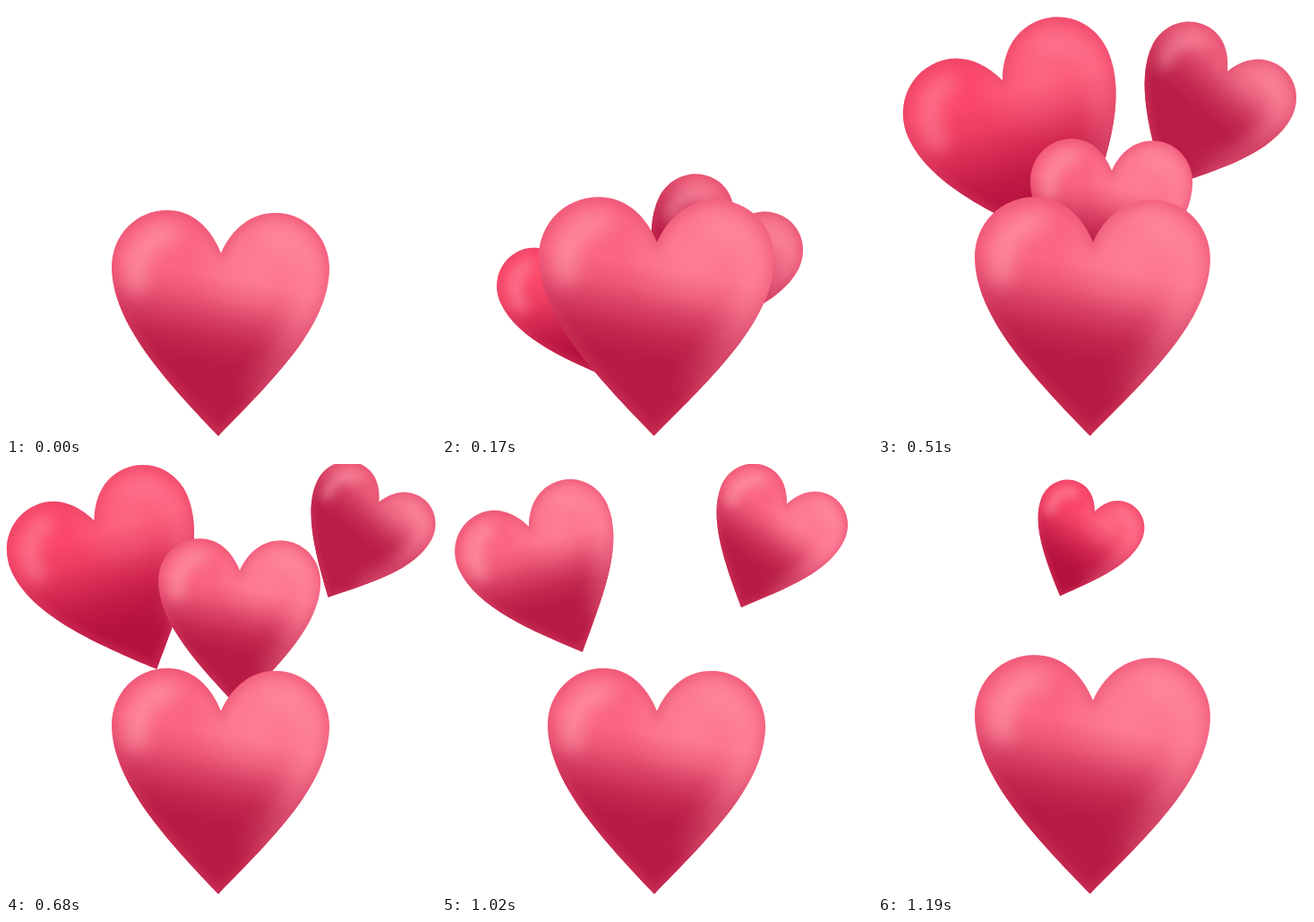
These frames come from a looping animation (480x480 px, 1.36 s). An HTML page with a canvas:

```html
<!DOCTYPE html>
<html lang="en">
<head>
<meta charset="utf-8">
<title>Floating hearts</title>
<style>
  html, body { margin: 0; width: 100%; height: 100%; overflow: hidden; background: #fff; }
  canvas { display: block; width: 480px; height: 480px; }
</style>
</head>
<body>
<canvas id="stage" width="480" height="480"></canvas>
<script>
const ctx = document.getElementById('stage').getContext('2d');
const SIZE = 480, STEP = 170, STEPS = 8;

// All paths share one origin: the notch between the lobes.
const outline = new Path2D('M0 0C-12-30-33-48-60-48C-95-48-122-20-122 16C-121 79-60 144-3 204C59 140 120 82 121 17C121-17 95-45 61-45C33-45 12-27 0 0Z');
const leftGlow = new Path2D('M-58-22C-84-20-98 2-94 34');
const rightGlow = new Path2D('M58-20C88-16 103 5 102 30C98 70 75 115 45 150');

const tones = {
  pink: { base: '#fb6683', dark: '184,28,69', from: 26, to: 122, glow: 1 },
  red: { base: '#fb486a', dark: '182,18,63', from: 15, to: 140, glow: 0.75 },
  deep: { base: '#f0607d', dark: '186,30,72', from: -20, to: 75, glow: 0.85 }
};

function softStroke(path, style, width, blur) {
  ctx.filter = `blur(${blur}px)`;
  ctx.strokeStyle = style;
  ctx.lineWidth = width;
  ctx.lineCap = 'round';
  ctx.stroke(path);
  ctx.filter = 'none';
}

function fade(gradient, color, ...alphas) {
  alphas.forEach((a, i) =>
    gradient.addColorStop(i / (alphas.length - 1), `rgba(${color},${a})`));
  return gradient;
}

function wash(style) {
  ctx.fillStyle = style;
  ctx.fillRect(-150, -80, 300, 300);
}

function drawHeart({ base, dark, from, to, glow }, x, y, scale, angle = 0, scaleY = scale) {
  ctx.save();
  ctx.translate(x, y);
  ctx.rotate(angle * Math.PI / 180);
  ctx.scale(scale, scaleY);
  ctx.fillStyle = base;
  ctx.fill(outline);
  ctx.clip(outline);

  const lobe = ctx.createRadialGradient(40, 14, 0, 40, 14, 78);
  wash(fade(lobe, '255,152,168', 0.5 * glow, 0.3 * glow, 0));
  wash(fade(ctx.createLinearGradient(0, from, -18, to), dark, 0, 0.2, 0.55, 0.85, 1));

  softStroke(outline, 'rgba(222,68,102,.45)', 10, 5 * scale);
  softStroke(leftGlow, `rgba(255,166,182,${0.65 * glow})`, 20, 10 * scale);
  const side = ctx.createLinearGradient(0, -20, 0, 150);
  softStroke(rightGlow, fade(side, '255,148,167', 0.7 * glow, 0.55 * glow, 0.28 * glow), 28, 13 * scale);
  ctx.restore();
}

// Hearts rise each step; after `turn` they drift sideways and lean by `spin`.
const flights = [
  { tone: 'red', first: 1, life: 5, x: 139, y: 287, rise: 102, turn: 2, drift: -50,
    size: 1, birth: 0.7, shrink: 0.12, power: 2, tilt: -23.7 },
  { tone: 'deep', first: 1, life: 5, x: 326, y: 243, rise: 85, turn: 0, drift: 32,
    size: 0.72, shrink: 0.18, tilt: 27.2 },
  { tone: 'pink', first: 3, life: 4, x: 261, y: 184, rise: 65, turn: 1, drift: 62,
    size: 0.745, shrink: 0.17, spin: 23 },
  { tone: 'pink', first: 5, life: 2, x: 130, y: 179, rise: 109, turn: 0, drift: -33,
    size: 0.745, tilt: -46, spin: 22 },
  { tone: 'red', first: 7, life: 1, x: 242, y: 53, size: 0.5, tilt: 21.5 }
];

function drawFlight(f, t) {
  const { rise = 0, turn = 0, drift = 0, birth = 1, shrink = 0, power = 1, tilt = 0, spin = 0 } = f;
  const turned = Math.max(0, t - turn);
  const scale = f.size * Math.min(1, birth + t) * (1 - shrink * Math.max(0, t - 2) ** power);
  // Keep the lobes inside the stage.
  const x = Math.min(SIZE - 108 * scale, Math.max(112 * scale, f.x + drift * turned));
  const y = Math.max(72 * scale, f.y - rise * t);
  drawHeart(tones[f.tone], x, y, scale, tilt + spin * Math.min(1, turned));
}

function drawStep(step) {
  ctx.fillStyle = '#fff';
  ctx.fillRect(0, 0, SIZE, SIZE);
  for (const f of flights) {
    const age = step - f.first;
    if (age >= 0 && age < f.life) drawFlight(f, age);
  }
  // The front heart pulses with its tip held in place.
  const swell = step % 2;
  drawHeart(tones.pink, 240, 276 - 12 * swell, 1 + 0.082 * swell, 0, 1 + 0.057 * swell);
}

let shown = -1;
const start = performance.now();
function tick() {
  const step = Math.floor((performance.now() - start) / STEP) % STEPS;
  if (step !== shown) drawStep(shown = step);
  requestAnimationFrame(tick);
}
tick();
</script>
</body>
</html>
```
